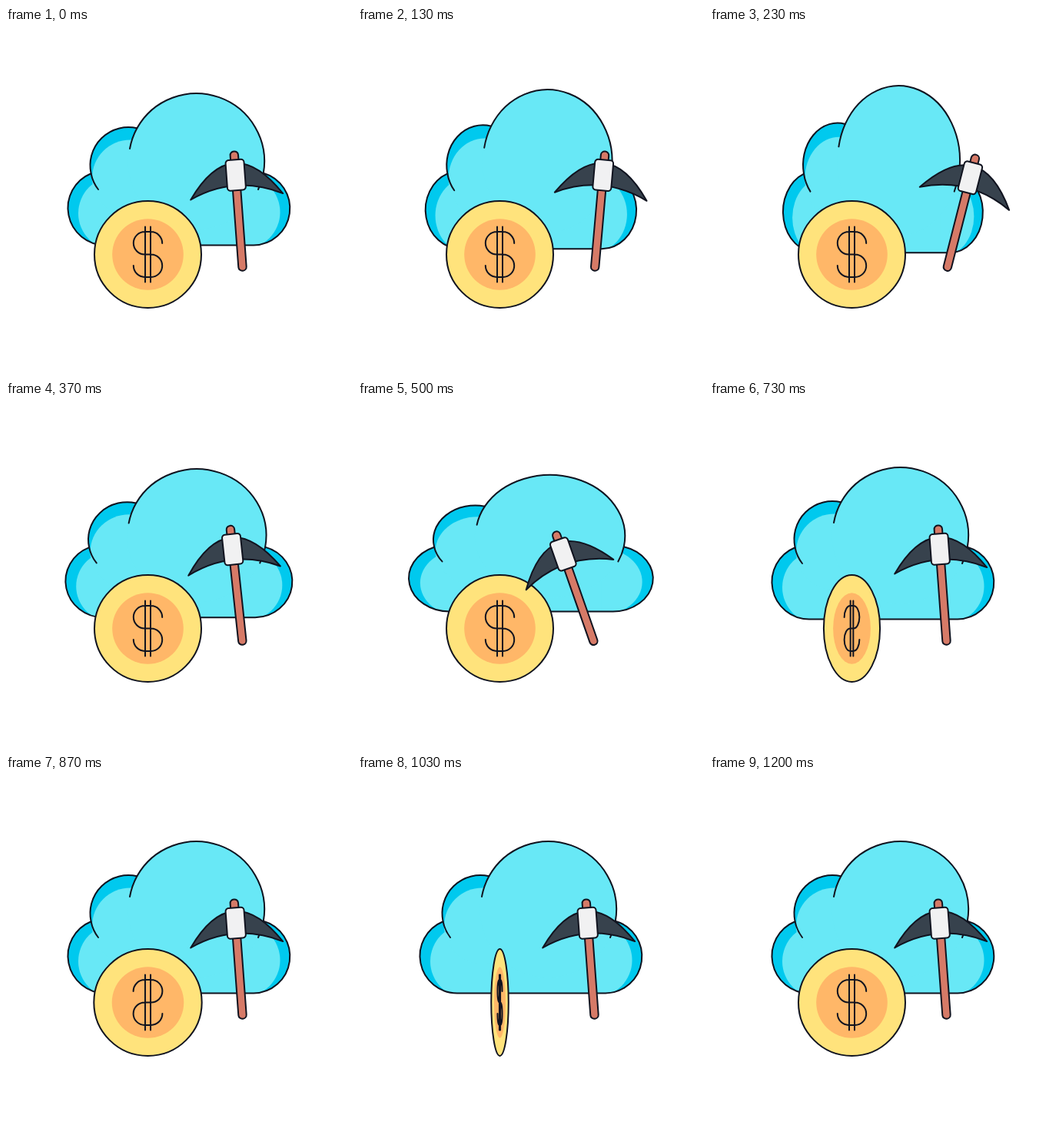
An HTML page for the animation above (1.23 s loop, 450 by 450 pixels).

```html
<!DOCTYPE html>
<html lang="en">
<head>
<meta charset="utf-8">
<title>Cloud mining</title>
<style>
  html, body { margin: 0; width: 100%; height: 100%; overflow: hidden; background: #fff; }
  svg { display: block; width: 100vw; height: 100vh; }
  svg * { vector-effect: non-scaling-stroke; }
  .line { stroke: #10131f; stroke-width: 2; stroke-linecap: round; stroke-linejoin: round; }
  .open { fill: none; }
  .dark { fill: #00c9ee; }
  .light { fill: #68e8f6; }
</style>
</head>
<body>
<svg viewBox="0 0 450 450">
  <defs>
    <path id="outline" d="M129 282.4A48.4 48.4 0 0 1 110.6 189.2A49.7 49.7 0 0 1 170.4 130.3A88.5 88.5 0 0 1 334.8 188.7A47.8 47.8 0 0 1 322 282.4Z"/>
    <clipPath id="inside"><use href="#outline"/></clipPath>
  </defs>

  <g id="cloud">
    <g clip-path="url(#inside)">
      <rect class="dark" x="70" y="80" width="310" height="210"/>
      <circle class="light" cx="142" cy="241" r="48"/>
      <circle class="light" cx="308.5" cy="239.5" r="48"/>
      <rect class="light" x="142" y="193" width="166" height="97"/>
      <circle class="dark" cx="159" cy="178.8" r="49.7"/>
      <circle class="light" cx="161.5" cy="195" r="49.5"/>
      <circle class="light" cx="247" cy="173.8" r="88.5"/>
    </g>
    <use class="line open" href="#outline"/>
    <path class="line open" d="M110.6 189.2A49.7 49.7 0 0 0 120 210M170.4 130.3A88.5 88.5 0 0 0 161 157M334.8 188.7A88.5 88.5 0 0 1 328 210"/>
  </g>

  <g id="coin">
    <circle class="line" r="69.5" fill="#ffe37c"/>
    <circle r="46.3" fill="#ffb768"/>
    <path class="line open" d="M18.7 -14.5A14.7 14.9 0 0 0 4 -29.4H-4A14.7 14.7 0 0 0 -4 0H4A14.7 14.7 0 0 1 4 29.4H-4A14.7 14.9 0 0 1 -18.7 14.5
      M-3.5 -36V36M3.5 -36V36"/>
  </g>

  <g id="sparks" fill="#ffd980"></g>

  <g id="pick">
    <rect class="line" x="-5.2" y="-155" width="10.4" height="155.7" rx="5" fill="#d67a67"/>
    <path class="line" d="M-60.7 -96.3Q-0.6 -183.3 59.5 -95.8Q-0.6 -125 -60.7 -96.3Z" fill="#37424d"/>
    <rect class="line" x="-12" y="-144" width="24" height="39.8" rx="4" fill="#f1f1f2"/>
  </g>
</svg>

<script>
  const LOOP = 1230;
  const $ = id => document.getElementById(id);

  // Keys are [step, value]; every segment eases in and out.
  const STRETCH = [[0, 0], [6, -0.1], [13, 0.1], [15, 0.1], [18, 0]];
  const SWING = [[0, 0], [6, 18.5], [13, -15.1], [17, 0]];
  const SPIN = [[13.6, 1], [23, -1.01], [32, 1]];

  // Flight offset after four steps, and the step at which the spark is gone.
  const HIT = { step: 13, x: 222.2, y: 246.8 };
  const SPARKS = [[-4, -14, 19], [-8, -2, 19], [15, -24, 18.2], [32, 15, 17.8], [7, 28, 17.8]]
    .map(([dx, dy, end]) => {
      const dot = document.createElementNS("http://www.w3.org/2000/svg", "circle");
      dot.setAttribute("r", 3.4);
      $("sparks").append(dot);
      return { dx, dy, end, dot };
    });

  function tween(keys, step) {
    if (step <= keys[0][0]) return keys[0][1];
    for (let i = 1; i < keys.length; i++) {
      const [a, from] = keys[i - 1], [b, to] = keys[i];
      if (step <= b) {
        const p = (step - a) / (b - a);
        return from + (to - from) * p * p * (3 - 2 * p);
      }
    }
    return keys[keys.length - 1][1];
  }

  function draw(step) {
    const s = tween(STRETCH, step);
    $("cloud").setAttribute("transform", `translate(225 184) scale(${1 + s} ${1 - s}) translate(-225 -184)`);
    $("coin").setAttribute("transform", `translate(184.5 294.5) scale(${tween(SPIN, step)} 1)`);
    $("pick").setAttribute("transform", `translate(307.8 315) rotate(${tween(SWING, step) - 4.2})`);

    const flight = (step - HIT.step) / 4;
    for (const { dx, dy, end, dot } of SPARKS) {
      dot.setAttribute("cx", HIT.x + dx * flight);
      dot.setAttribute("cy", HIT.y + dy * flight);
      dot.setAttribute("opacity", flight > 0 ? Math.max(0, Math.min(1, (end - step) / 2)) : 0);
    }
  }

  // Shown at 30 pictures a second, with every eleventh one held twice.
  function tick() {
    const shown = Math.floor((performance.now() % LOOP) * 0.03 + 0.15);
    draw(Math.floor(shown * 10 / 11));
    requestAnimationFrame(tick);
  }
  tick();
</script>
</body>
</html>
```
